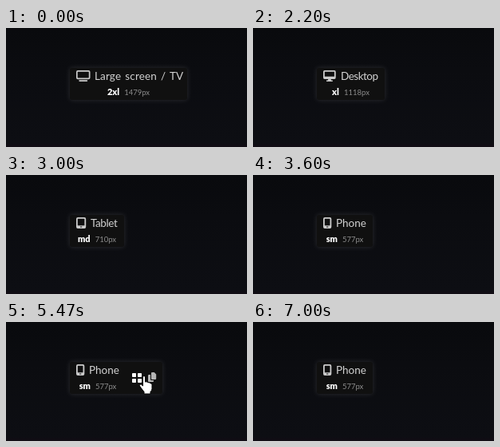
Write an HTML page that moves like this. It is 302x149 px and loops after 7.19 s.

```html
<!DOCTYPE html>
<html lang="en">
<head>
<meta charset="utf-8">
<title>Breakpoint badge</title>
<style>
  html, body { margin: 0; width: 100%; height: 100%; overflow: hidden; background: #0b0c10; }
  svg { display: block; width: 100%; height: 100%; }
  #card { fill: #101010; filter: drop-shadow(0 0 3px rgba(255, 255, 255, .13)); }
  #label { font: 13.5px Lato, sans-serif; fill: #d2d2d2; }
  #size { font: 9.5px Lato, sans-serif; fill: #8c8c8c; text-anchor: middle; }
  #key { font-size: 11px; font-weight: 900; fill: #fff; }
  #tip text { font: 11.6px "Open Sans", sans-serif; fill: #fff; }
  .icon { fill: #cbcbcb; fill-rule: evenodd; }
  .button { fill: #b4b4b4; }
  .button.over { fill: #fff; }
  #cursor { fill: #fff; stroke: #000; stroke-width: 1; stroke-linejoin: round; }
</style>
</head>
<body>
<svg viewBox="0 0 302 149" preserveAspectRatio="none">
  <defs>
    <linearGradient id="sky" x2="0" y2="1">
      <stop offset="0" stop-color="#090a0d"/>
      <stop offset=".35" stop-color="#0b0c10"/>
      <stop offset=".96" stop-color="#0d0e13"/>
      <stop offset="1" stop-color="#110c14"/>
    </linearGradient>
  </defs>
  <rect width="302" height="149" fill="url(#sky)"/>
  <rect id="card" x="80" y="50" height="40" rx="3"/>
  <path id="icon" class="icon" transform="translate(88 53)"/>
  <text id="label" y="65"></text>
  <text id="size" y="84"><tspan id="key"></tspan><tspan id="px" dx="6"></tspan></text>
  <g id="buttons">
    <path class="button" d="M159 64h3.200q.8 0 .8.8v3.400q0 .8-.8.8H159q-1 0-1-.8v-3.400q0-.8 1-.8zm7 0h3.200q.8 0 .8.8v3.400q0 .8-.8.8H166q-1 0-1-.8v-3.400q0-.8 1-.8zm-7 7h3.200q.8 0 .8.8v3.400q0 .8-.8.8H159q-1 0-1-.8v-3.400q0-.8 1-.8zm7 0h3.200q.8 0 .8.8v3.400q0 .8-.8.8H166q-1 0-1-.8v-3.400q0-.8 1-.8z"/>
    <path class="button" d="M183 63h2.800l2.400 2.400V71q0 1-1 1H183q-1 0-1-1v-7q0-1 1-1zM179 66h2v6q0 1 1 1h3v1q0 1-1 1h-5q-1 0-1-1v-7q0-1 1-1z"/>
  </g>
  <path id="cursor"/>
  <g id="tip">
    <rect x="188.500" y="82.500" width="87" height="24" fill="#202020" stroke="#d0d0d0"/>
    <text x="196" y="99">Copy selector</text>
  </g>
</svg>
<script>
const LOOP = 7190;
const $ = id => document.getElementById(id);

// Ordered by the upper limit of each breakpoint; spacing is [letter, word].
const devices = [
  { key: 'sm', max: 640, label: 'Phone', width: 70, textX: 104, spacing: [0, 0],
    icon: 'M2 0h6.300q2 0 2 2v10q0 2-2 2H2q-2 0-2-2V2Q0 0 2 0zM2.300 1.800q-.5 0-.5.5v7.900h6.700V2.300q0-.5-.5-.5zM4 11.400v1h2.300v-1z' },
  { key: 'md', max: 768, label: 'Tablet', width: 68, textX: 106, spacing: [-.4, 0],
    icon: 'M2 0h8.200q2 0 2 2v10q0 2-2 2H2q-2 0-2-2V2Q0 0 2 0zM2.300 1.700q-.5 0-.5.5v8h8.600v-8q0-.5-.5-.5zM5 11.400v1.100h2.200v-1.100z' },
  { key: 'lg', max: 1024, label: 'Laptop', width: 82, textX: 111, spacing: [-.2, 0],
    icon: 'M3.500 1.500h10.500q1.700 0 1.700 1.700V10h-1.800V3.300H3.600V10H1.800V3.200q0-1.700 1.700-1.700zM0 10.700h17.500q0 2-2 2H2q-2 0-2-2z' },
  { key: 'xl', max: 1280, label: 'Desktop', width: 85, textX: 110, spacing: [-.5, 0],
    icon: 'M1.700 0H14q1.700 0 1.700 1.700v7.600q0 1.700-1.700 1.700H9.600l.4 1.400h1.800V14H4v-1.600h1.800L6.200 11H1.700Q0 11 0 9.300V1.700Q0 0 1.700 0zM1.800 1.800v6h12.100v-6z' },
  { key: '2xl', max: Infinity, label: 'Large screen / TV', width: 147, textX: 111, spacing: [.15, 1.5],
    icon: 'M2 0h13.500q2 0 2 2v7.200q0 2-2 2H2q-2 0-2-2V2Q0 0 2 0zM2.100 1.700q-.4 0-.4.4v7q0 .4.4.4h13.300q.4 0 .4-.4v-7q0-.4-.4-.4zM4 12.300h9.500q.7 0 .7.8t-.7.8H4q-.7 0-.7-.8t.7-.8z' }
];

const cursors = {
  arrow: 'M0 0V16l3.700-3.500 2.500 5.800 2.500-1.100-2.500-5.600h5.200z',
  beam: 'M-3.500-8h3l.5.5.5-.5h3v2H1V6h2.500v2h-3L0 7.500l-.5.5h-3V6H-1V-6h-2.500z',
  hand: 'M-1.500 12V1a1.500 1.500 0 0 1 3 0v6q3-.8 3.200.8q2.600-.6 2.900.9q2.400-.4 2.400 1.800v5q0 2-2 4v2.500h-8v-2.500l-5-6.500q-1.500-2 0-3q1.500-.5 3.500 2z'
};

// Times are in ticks of 1/15 s.
const widthKeys = [[22, 1479], [23, 1471], [25, 1416], [28, 1292], [31, 1166], [33, 1118],
  [34, 1108], [36, 1040], [39, 902], [42, 786], [44, 728], [45, 710], [47, 668], [48, 668], [50, 634], [54, 577]];
const cursorKeys = [[64, 143, 9], [66, 139, 29], [68, 134, 47], [70, 130, 57], [72, 127, 60],
  [74, 127, 60], [75, 126, 68], [77, 136, 69], [80, 162, 69], [83, 178, 68], [85, 181, 67],
  [100, 181, 67], [101, 183, 75], [102, 186, 94], [103, 188, 110], [104, 189, 120]];

function sample(keys, tick) {
  const next = keys.findIndex(k => k[0] > tick);
  if (next === 0) return keys[0].slice(1);
  if (next < 0) return keys[keys.length - 1].slice(1);
  const a = keys[next - 1], b = keys[next];
  const p = (tick - a[0]) / (b[0] - a[0]);
  return a.slice(1).map((v, i) => v + (b[i + 1] - v) * p);
}

const inside = ([x, y], left, top, right, bottom) => x >= left && x < right && y >= top && y < bottom;
const show = (el, on) => { el.style.display = on ? '' : 'none'; };

function draw(time) {
  const tick = Math.floor((time + 5) * .015);
  const width = Math.round(sample(widthKeys, tick)[0]);
  const device = devices.find(d => width < d.max);
  const pos = sample(cursorKeys, tick);
  const active = tick >= 64 && tick <= 104;
  const hover = active && inside(pos, 80, 50, 196, 90);
  const overButton = [inside(pos, 154, 58, 174, 82), inside(pos, 174, 58, 192, 82)].map(v => v && hover);

  $('card').setAttribute('width', hover ? 116 : device.width);
  $('icon').setAttribute('d', device.icon);
  $('label').textContent = device.label;
  $('label').setAttribute('x', device.textX);
  $('label').style.letterSpacing = device.spacing[0] + 'px';
  $('label').style.wordSpacing = device.spacing[1] + 'px';
  $('key').textContent = device.key;
  $('px').textContent = width + 'px';
  $('size').setAttribute('x', 80 + device.width / 2);

  show($('buttons'), hover);
  [...$('buttons').children].forEach((b, i) => b.classList.toggle('over', overButton[i]));

  const kind = overButton.includes(true) ? 'hand'
    : hover && inside(pos, 104, 53, 146, 87) ? 'beam' : 'arrow';
  show($('cursor'), active);
  $('cursor').setAttribute('d', cursors[kind]);
  $('cursor').style.strokeWidth = kind === 'beam' ? .6 : 1;
  $('cursor').setAttribute('transform', `translate(${pos.map(Math.round).join(' ')})`);
  show($('tip'), tick >= 91 && tick < 101);
}

const start = performance.now();
function frame() {
  draw((performance.now() - start) % LOOP);
  requestAnimationFrame(frame);
}
frame();
</script>
</body>
</html>
```
